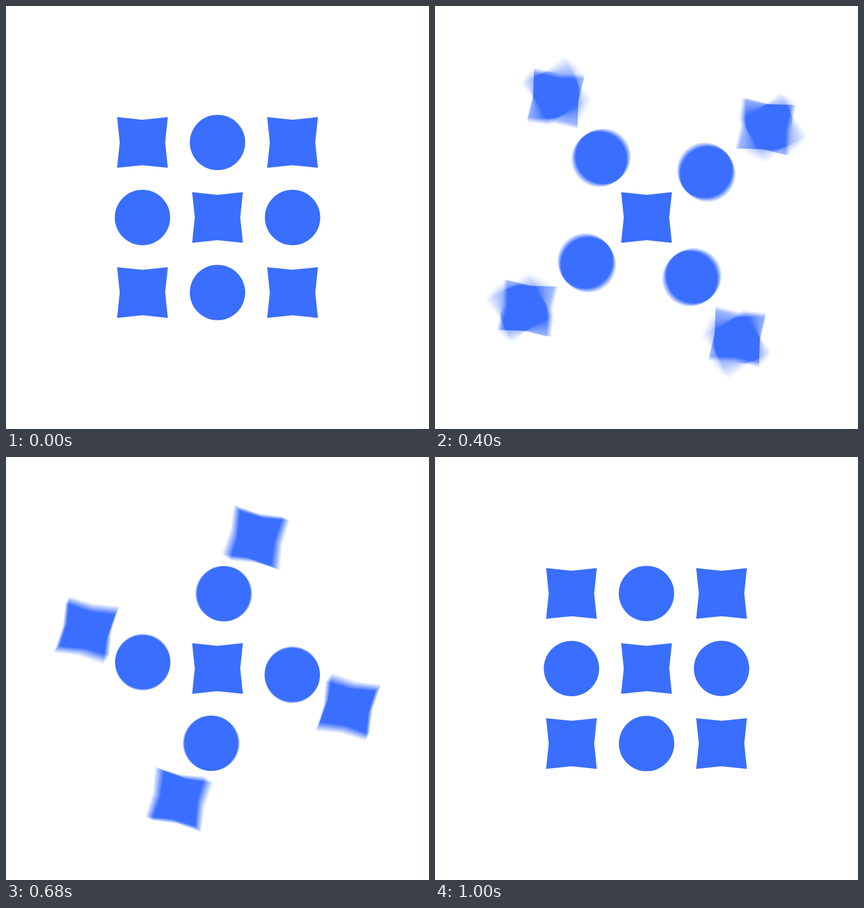
Recreate the animation shown at these times as an HTML page with a canvas. Size 748 px wide and 748 px high, loop 1040 ms.

```html
<!DOCTYPE html>
<html lang="en">
<head>
<meta charset="utf-8">
<title>Spinning grid</title>
<style>
  html, body { margin: 0; width: 100%; height: 100%; overflow: hidden; background: #fff; }
  canvas { display: block; width: 748px; height: 748px; }
</style>
</head>
<body>
<canvas id="stage" width="748" height="748"></canvas>
<script>
const ctx = document.getElementById('stage').getContext('2d');
const SIZE = 748, MID = SIZE / 2, BLUE = '#3a6eff';
const LOOP = 1040, STEP = 40, SHUTTER = 20, SAMPLES = 32;
const GAP = 132.7, DOT = 48.9, CORNER = 44.8, NOTCH = 40.1;
const DIAGONAL = GAP * Math.SQRT2, PUSH = 95.5;

const rad = deg => deg * Math.PI / 180;
const span = (t, from, to) => Math.min(1, Math.max(0, (t - from) / (to - from)));
const smooth = u => u * u * (3 - 2 * u);

function bezier(x1, y1, x2, y2) {
  const at = (a, b, u) => 3 * a * u * (1 - u) ** 2 + 3 * b * u * u * (1 - u) + u ** 3;
  return x => {
    if (x <= 0 || x >= 1) return x <= 0 ? 0 : 1;
    let lo = 0, hi = 1;
    for (let i = 0; i < 24; i++) {
      const u = (lo + hi) / 2;
      if (at(x1, x2, u) < x) lo = u; else hi = u;
    }
    return at(y1, y2, lo);
  };
}
const snap = bezier(0.1, 0.89, 0.67, 1);

// time, angle, angular speed
const DOT_KEYS = [
  [160, 0, 0], [320, 18.9, 0.2], [400, 37.2, 0.232], [520, 64.6, 0.19],
  [680, 85.2, 0.077], [840, 90.4, 0], [1040, 90, 0]
];

function dotAngle(t) {
  if (t <= DOT_KEYS[0][0]) return 0;
  const i = DOT_KEYS.findIndex(k => k[0] >= t);
  if (i < 0) return 90;
  const [t0, a0, v0] = DOT_KEYS[i - 1], [t1, a1, v1] = DOT_KEYS[i];
  const h = t1 - t0, u = (t - t0) / h, s = smooth(u);
  return a0 + (a1 - a0) * s + h * u * (1 - u) * (v0 * (1 - u) - v1 * u);
}

function star(x, y, turn) {
  ctx.save();
  ctx.translate(x, y);
  ctx.rotate(turn);
  ctx.beginPath();
  for (let i = 0; i < 4; i++) {
    ctx.lineTo(-CORNER, -CORNER);
    ctx.lineTo(0, -NOTCH);
    ctx.rotate(Math.PI / 2);
  }
  ctx.fill();
  ctx.restore();
}

function dot(x, y) {
  ctx.beginPath();
  ctx.arc(x, y, DOT, 0, 2 * Math.PI);
  ctx.fill();
}

function pose(t) {
  const swing = rad(dotAngle(t));
  const orbit = rad(90 * smooth(span(t, 280, 920)));
  const spin = rad(-360 * snap(span(t, 400, 960)));
  const push = t < 440 ? smooth(span(t, 280, 440)) : 1 - smooth(span(t, 440, 960));
  const reach = DIAGONAL + PUSH * push;
  star(MID, MID, 0);
  for (let i = 0; i < 4; i++) {
    const a = i * Math.PI / 2 - swing;
    const b = (i + 0.5) * Math.PI / 2 + orbit;
    dot(MID + GAP * Math.cos(a), MID + GAP * Math.sin(a));
    star(MID + reach * Math.cos(b), MID + reach * Math.sin(b), orbit + spin);
  }
}

function cover(mode, color) {
  ctx.globalCompositeOperation = mode;
  ctx.fillStyle = color;
  ctx.fillRect(0, 0, SIZE, SIZE);
}

// Sum shutter samples in the alpha channel, then colour the result.
function draw(t) {
  ctx.clearRect(0, 0, SIZE, SIZE);
  ctx.globalCompositeOperation = 'lighter';
  ctx.globalAlpha = 8.1 / 255;
  ctx.fillStyle = '#000';
  for (let i = 0; i < SAMPLES; i++) pose(t + SHUTTER * ((i + 0.5) / SAMPLES - 0.5));
  ctx.globalAlpha = 1;
  cover('source-in', BLUE);
  cover('destination-over', '#fff');
}

const start = performance.now();
let shown = -1;
function tick() {
  const t = Math.floor((performance.now() - start) % LOOP / STEP) * STEP;
  if (t !== shown) draw(shown = t);
  requestAnimationFrame(tick);
}
tick();
</script>
</body>
</html>
```
